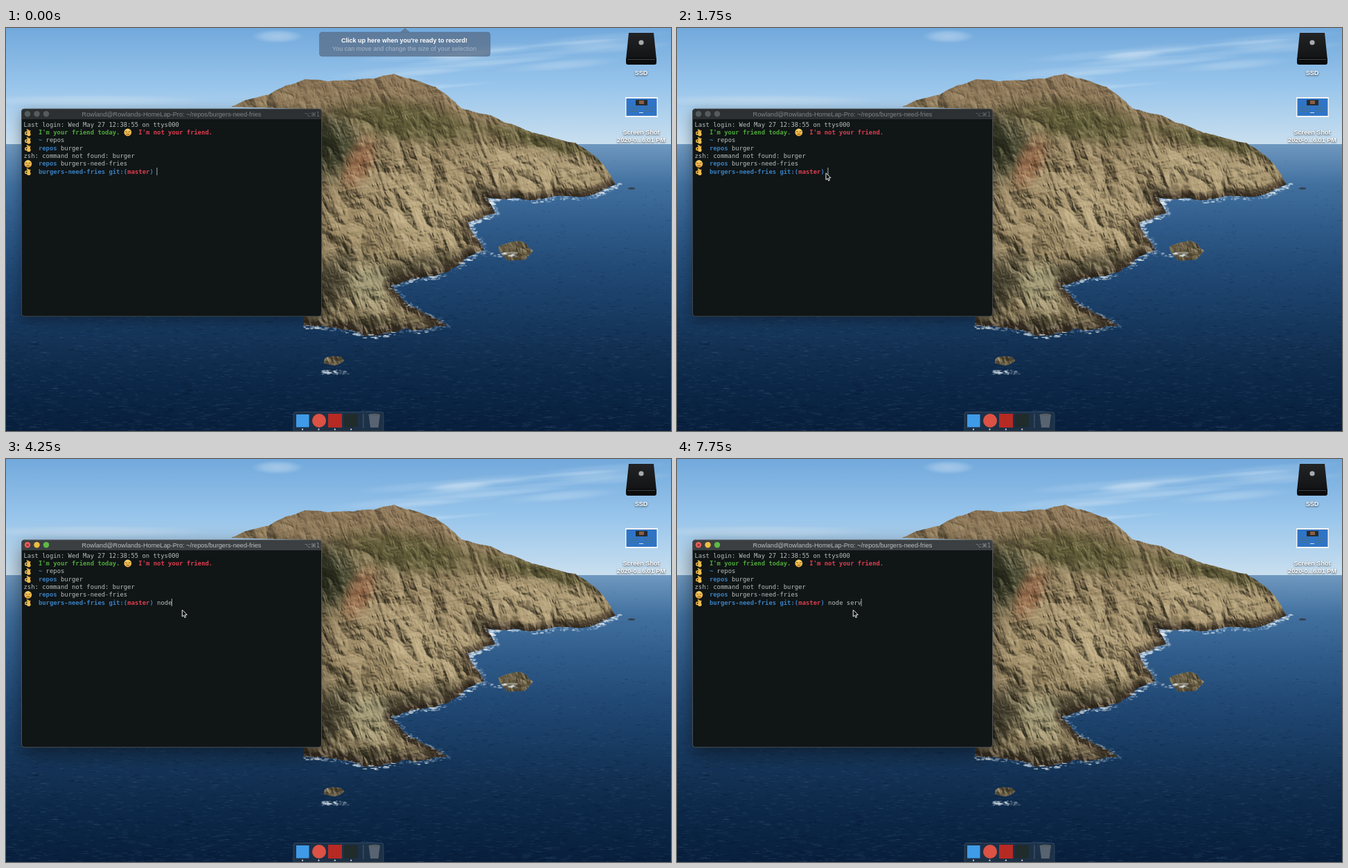
Animation of 960x583 px, one loop 8 s. Source, as an HTML page with a canvas:

```html
<!DOCTYPE html>
<html lang="en">
<head>
<meta charset="utf-8">
<title>Desktop recording</title>
<style>
  html, body { margin: 0; width: 100%; height: 100%; overflow: hidden; background: #12304f; }
  canvas { display: block; width: 100%; height: 100%; }
</style>
</head>
<body>
<canvas id="stage" width="960" height="583"></canvas>
<script>
const W = 960, H = 583, LOOP = 8000, STEP = 250;
const UI = '"Liberation Sans", sans-serif';
const MONO = '"DejaVu Sans Mono", monospace';
const SIZE = 8.887, CHAR = 5.35, LEFT = 25.5, FIRST = 142.7, LINE = 11.33;
const BLUE = '#3a80c0', RED = '#dd3e50', GREEN = '#4fa83a', GREY = '#b9bec0';
const stage = document.getElementById('stage').getContext('2d');

let seed = 7;
function rand(a = 0, b = 1) {
  seed = (seed * 1664525 + 1013904223) % 4294967296;
  return a + (b - a) * seed / 4294967296;
}

const lerp = (a, b, u) => a + (b - a) * u;

function layer() {
  const canvas = document.createElement('canvas');
  canvas.width = W;
  canvas.height = H;
  return canvas.getContext('2d');
}

function trace(c, pts) {
  c.beginPath();
  pts.forEach(([x, y]) => c.lineTo(x, y));
}

function disc(c, fill, x, y, rx, ry = rx) {
  c.beginPath();
  c.ellipse(x, y, rx, ry, 0, 0, Math.PI * 2);
  c.fillStyle = fill;
  c.fill();
}

function box(c, fill, x, y, w, h, r = 0) {
  c.beginPath();
  c.roundRect(x, y, w, h, r);
  c.fillStyle = fill;
  c.fill();
}

function outline(c, color, width = 0.8) {
  c.strokeStyle = color;
  c.lineWidth = width;
  c.stroke();
}

function label(c, text, x, y, font, fill, align = 'left') {
  c.font = font;
  c.textAlign = align;
  c.fillStyle = fill;
  c.fillText(text, x, y);
}

function vertical(c, y0, y1, ...colors) {
  const g = c.createLinearGradient(0, y0, 0, y1);
  colors.forEach((col, i) => g.addColorStop(i / (colors.length - 1), col));
  return g;
}

// Soft elliptic patch; color is a "r,g,b" string
function glow(c, color, alpha, x, y, rx, ry, tilt = 0) {
  c.save();
  c.translate(x, y);
  c.rotate(tilt);
  c.scale(rx, ry);
  const g = c.createRadialGradient(0, 0, 0, 0, 0, 1);
  g.addColorStop(0, `rgba(${color},${alpha})`);
  g.addColorStop(0.5, `rgba(${color},${alpha * 0.75})`);
  g.addColorStop(1, `rgba(${color},0)`);
  disc(c, g, 0, 0, 1);
  c.restore();
}

function drawSky(c) {
  box(c, vertical(c, 0, 168, '#72a9dc', '#98c5eb', '#c9dfef'), 0, 0, W, 169);
  for (let i = 0; i < 22; i++) {
    const x = rand(520, 900), y = 75 - (x - 520) * 0.13 + rand(-28, 28);
    glow(c, '228,239,247', rand(0.1, 0.3), x, y, rand(40, 110), rand(3, 9), -0.08);
  }
  glow(c, '228,239,247', 0.4, 392, 12, 38, 10);
  glow(c, '215,230,242', 0.4, 120, 105, 180, 9);
}

function drawSea(c) {
  box(c, vertical(c, 168, H, '#6f98bf', '#41709f', '#2f5b8a', '#224a76', '#193d65', '#123052', '#0b2646', '#08203d'),
    0, 168, W, H - 168);
  for (let i = 0; i < 5000; i++) {
    const near = Math.sqrt(rand());
    c.fillStyle = rand() < 0.55 ? 'rgba(3,16,38,.2)' : 'rgba(120,155,190,.1)';
    c.fillRect(rand(-10, W), 170 + near * 413, 2 + near * rand(2, 10), 0.5 + near * 0.7);
  }
}

// Midpoint displacement gives a broken, rocky line
function rough(pts, amount = 0.09, depth = 4) {
  if (!depth) return pts;
  const out = [pts[0]];
  for (let i = 1; i < pts.length; i++) {
    const [ax, ay] = pts[i - 1], [bx, by] = pts[i], k = rand(-amount, amount);
    out.push([(ax + bx) / 2 + (by - ay) * k, (ay + by) / 2 - (bx - ax) * k], pts[i]);
  }
  return rough(out, amount, depth - 1);
}

function rock(x, y, w, h) {
  const pts = [];
  for (let a = 0; a < Math.PI * 2; a += 0.5) {
    const r = rand(0.85, 1.1);
    pts.push([x + Math.cos(a) * w * r, y + Math.sin(a) * h * r]);
  }
  return pts;
}

function hash(x, y) {
  const v = Math.sin(x * 127.1 + y * 311.7) * 43758.5453;
  return v - Math.floor(v);
}

function noise(x, y) {
  const i = Math.floor(x), j = Math.floor(y), u = x - i, v = y - j;
  return lerp(lerp(hash(i, j), hash(i + 1, j), u), lerp(hash(i, j + 1), hash(i + 1, j + 1), u), v);
}

function height(x, y) {
  let sum = 0;
  for (let size = 34; size > 2; size /= 2.1) {
    sum += size * Math.abs(noise((x - y * 0.35) / size, (y + x * 0.2) / (size * 1.3)) - 0.5);
  }
  return sum;
}

// Rock relief: slopes facing the upper right are lit
function makeRelief() {
  const c = layer(), x0 = 310, y0 = 60, w = 580, h = 445;
  const img = c.createImageData(w, h);
  let above = new Float32Array(w);
  for (let y = 0; y < h; y++) {
    const row = new Float32Array(w);
    for (let x = 0; x < w; x++) {
      row[x] = height(x, y);
      const slope = row[x] - above[Math.min(x + 1, w - 1)];
      const strength = Math.min(1, 0.45 + y / 260);
      const tone = slope > 0 ? [226, 208, 168, 62] : [28, 25, 16, 95];
      tone[3] *= Math.min(2.1, Math.abs(slope)) * strength;
      img.data.set(tone, (y * w + x) * 4);
    }
    above = row;
  }
  c.putImageData(img, x0, y0);
  return c.canvas;
}

function foam(c, line, count) {
  for (let i = 0; i < count; i++) {
    const [x, y] = line[Math.floor(rand(0, line.length))];
    const patch = noise(x / 22, y / 22);
    disc(c, `rgba(224,234,240,${rand(0.2, 1) * patch})`,
      x + rand(-3, 7), y + rand(-1, 5), rand(0.7, 1 + patch * 5), rand(0.4, 1.3));
  }
}

function drawIsland(c) {
  const ridge = rough([[325, 114], [432, 74], [500, 76], [560, 66], [620, 85], [657, 116],
    [740, 143], [822, 166], [864, 200], [880, 226]], 0.05);
  const shore = rough([[880, 226], [840, 243], [695, 246], [707, 268], [667, 282], [690, 321],
    [640, 352], [555, 372], [582, 402], [637, 430], [520, 446], [430, 430]], 0.07);
  const islet = rock(735, 322, 24, 15), reef = rock(472, 481, 15, 7);

  const land = layer();
  land.fillStyle = vertical(land, 66, 446, '#8d7658', '#8f7d5b', '#a08d68', '#94835f', '#776a4d');
  [[...ridge, ...shore, [430, 117]], islet, reef].forEach(pts => { trace(land, pts); land.fill(); });

  land.globalCompositeOperation = 'source-atop';
  const green = '72,74,38', dark = '38,38,28', pale = '186,168,128';
  glow(land, green, 0.8, 580, 135, 125, 36, 0.15);
  glow(land, green, 0.7, 765, 162, 120, 16, 0.24);
  glow(land, '45,52,34', 1, 466, 170, 50, 62, 0.3);
  glow(land, '148,92,62', 0.7, 510, 195, 24, 50, 0.45);
  glow(land, pale, 0.75, 760, 203, 130, 34, 0.15);
  glow(land, pale, 0.75, 600, 265, 80, 58, 0.5);
  glow(land, dark, 0.5, 692, 240, 40, 18);
  glow(land, dark, 0.8, 470, 370, 34, 70, 0.5);
  glow(land, dark, 0.65, 585, 350, 110, 24, -0.25);
  glow(land, '178,172,134', 0.8, 525, 374, 42, 50);
  glow(land, dark, 0.7, 520, 437, 130, 24);
  [islet, reef].forEach(pts => { trace(land, pts); land.fillStyle = 'rgba(52,47,33,.6)'; land.fill(); });
  land.lineJoin = 'round';
  for (let w = 4; w <= 24; w += 5) {
    trace(land, shore);
    outline(land, 'rgba(42,34,25,.28)', w);
  }
  land.drawImage(makeRelief(), 0, 0);

  foam(c, shore, 650);
  c.drawImage(land.canvas, 0, 0);
  foam(c, shore, 260);
  foam(c, islet.map(([x]) => [x - 22, 326]), 40);
  foam(c, reef.map(([x]) => [x, 496]), 90);
  disc(c, '#34404a', 903, 232, 5, 1.5);
}

function desktopLabel(c, text, y) {
  c.save();
  c.shadowColor = 'rgba(0,0,0,.75)';
  c.shadowBlur = 2.5;
  c.shadowOffsetY = 1;
  label(c, text, 917, y, `bold 9.1px ${UI}`, '#fff', 'center');
  c.restore();
}

function drawIcons(c) {
  trace(c, [[899, 7], [935, 7], [939, 46], [895, 46]]);
  c.fillStyle = vertical(c, 7, 46, '#232426', '#111214');
  c.fill();
  box(c, '#0b0c0d', 895, 43, 44, 10, 3);
  box(c, '#54585b', 897, 45, 40, 0.8);
  disc(c, '#a7aaac', 917, 21, 3.6);
  desktopLabel(c, 'SSD', 68);

  box(c, '#f2f4f5', 894, 100, 47, 29);
  box(c, '#2f74c6', 895.5, 102, 44, 25);
  box(c, '#252b30', 909, 104, 17, 8);
  box(c, '#8a5d43', 914, 105, 7, 5);
  for (let i = 0; i < 6; i++) box(c, '#42718f', 899 + (i % 2) * 22, 114 + (i >> 1) * 3, 14, 1);
  box(c, '#d0dfeb', 914, 122, 6, 1);
  desktopLabel(c, 'Screen Shot', 153.5);
  desktopLabel(c, '2020-0...6.01 PM', 164.5);
}

function drawDock(c) {
  box(c, 'rgba(36,54,74,.72)', 415, 555.5, 130, 32, 3);
  outline(c, 'rgba(105,130,155,.4)');
  box(c, '#3f9be8', 419, 559, 18.5, 18.5);
  disc(c, '#dc5245', 452, 568, 10);
  box(c, '#b62a24', 465, 558, 20, 20);
  box(c, '#202b2b', 488, 558.5, 20, 19, 2);
  box(c, 'rgba(145,165,180,.5)', 515.5, 558, 0.8, 21);
  trace(c, [[523.5, 559], [540, 559], [537.5, 578], [526, 578]]);
  c.fillStyle = 'rgba(120,128,135,.65)';
  c.fill();
  disc(c, '#555d65', 531.7, 559.3, 8, 1.6);
  for (let i = 0; i < 4; i++) disc(c, '#d7dde2', 428 + i * 23.4, 580.7, 1.1);
}

function makeDesktop() {
  const c = layer();
  [drawSky, drawSea, drawIsland, drawIcons, drawDock].forEach(draw => draw(c));
  return c.canvas;
}

function hand(x, y) {
  stage.lineCap = 'round';
  stage.beginPath();
  for (let i = 0; i < 3; i++) {
    stage.moveTo(x + 1.5, y + 2);
    stage.lineTo(x - 1.5 + i * 2.1, y - 4.2 + i * 0.9);
  }
  stage.moveTo(x - 0.6, y + 1);
  stage.arc(x - 2.4, y + 1, 1.8, 0, Math.PI * 2);
  outline(stage, '#f0bd4c', 1.5);
  disc(stage, '#f0bd4c', x + 0.9, y + 2.6, 2.7, 2.7);
}

function face(x, y) {
  disc(stage, vertical(stage, y - 5, y + 5, '#f8d465', '#e8a33c'), x, y, 5.4);
  stage.beginPath();
  for (const s of [-1, 1]) {
    stage.moveTo(x + s * 3.4, y - 1.4);
    stage.lineTo(x + s * 1.3, y - 0.6);
  }
  stage.moveTo(x - 1.9, y + 3);
  stage.quadraticCurveTo(x, y + 1.2, x + 1.9, y + 3);
  outline(stage, '#6e4419');
}

function term(row, col, text, fill = GREY, bold = false) {
  label(stage, text, LEFT + col * CHAR, FIRST + row * LINE, `${bold ? 'bold ' : ''}${SIZE}px ${MONO}`, fill);
}

function drawWindow(active, typed, caretOn) {
  stage.save();
  stage.shadowColor = `rgba(0,0,0,${active ? 0.5 : 0.38})`;
  stage.shadowBlur = active ? 30 : 20;
  stage.shadowOffsetY = active ? 10 : 6;
  box(stage, '#101516', 22.5, 117, 433, 300, 4);
  stage.restore();
  box(stage, active ? '#3b3f41' : '#2c3032', 22.5, 117, 433, 15, [4, 4, 0, 0]);
  stage.beginPath();
  stage.roundRect(22.5, 117, 433, 300, 4);
  outline(stage, active ? '#5a5f61' : '#4b5052');

  ['#ec5f57', '#f0bd3f', '#5dbb45'].forEach((col, i) =>
    disc(stage, active ? col : '#565b5d', 31 + i * 13.5, 124.3, 4.2));
  if (active) label(stage, '×', 31, 127.2, `bold 8px ${UI}`, '#7c241f', 'center');
  label(stage, 'Rowland@Rowlands-HomeLap-Pro: ~/repos/burgers-need-fries', 239, 127.7,
    `9.18px ${UI}`, active ? '#bbbfc1' : '#7e8486', 'center');
  label(stage, '⌥⌘1', 453, 127.5, '8px "DejaVu Sans", sans-serif', active ? '#8b9092' : '#656b6d', 'right');

  term(0, 0, 'Last login: Wed May 27 12:38:55 on ttys000');
  [1, 2, 3, 6].forEach(row => hand(32, 139.8 + row * LINE));
  face(175.8, 151);
  face(31.8, 196.5);
  term(1, 4, "I'm your friend today.", GREEN, true);
  term(1, 31, "I'm not your friend.", RED, true);
  term(2, 4, '~', BLUE, true);
  term(2, 6, 'repos');
  term(3, 4, 'repos', BLUE, true);
  term(3, 10, 'burger');
  term(4, 0, 'zsh: command not found: burger');
  term(5, 4, 'repos', BLUE, true);
  term(5, 10, 'burgers-need-fries');
  term(6, 4, 'burgers-need-fries git:(', BLUE, true);
  term(6, 28, 'master', RED, true);
  term(6, 34, ')', BLUE, true);
  term(6, 36, typed);
  if (caretOn) box(stage, '#b4b9bb', 217.5 + typed.length * CHAR, 202, 0.9, 11);
}

function drawHint() {
  const fill = 'rgba(88,110,137,.76)';
  box(stage, fill, 452.5, 6, 246.5, 35, 4);
  outline(stage, 'rgba(70,95,125,.5)');
  trace(stage, [[569, 6], [576, 0], [583, 6]]);
  stage.fill();
  label(stage, "Click up here when you're ready to record!", 575, 21.3, `bold 9px ${UI}`, '#fff', 'center');
  label(stage, 'You can move and change the size of your selection', 575, 32.7, `9px ${UI}`, '#a5b6c8', 'center');
}

function drawPointer(x, y) {
  stage.save();
  stage.translate(x, y);
  trace(stage, [[0.5, 0], [0.5, 9.5], [2.7, 7.6], [4.2, 11], [5.9, 10.2], [4.4, 7], [7.2, 6.8]]);
  stage.closePath();
  stage.fillStyle = '#0a0a0a';
  stage.fill();
  outline(stage, '#eef0f0', 1);
  stage.restore();
}

// Keys are [step, ...values], joined by straight lines
const POINTER = [[1, 535, 62], [4, 224, 210], [5, 224, 210], [7, 214.5, 210], [9, 214.5, 210], [11, 253.8, 218.5]];
const TYPING = [[13, 0], [18, 5], [20, 8], [23, 8], [27, 4], [31, 9]];

function track(keys, s) {
  const next = keys.findIndex(k => k[0] > s);
  if (next < 0) return keys[keys.length - 1].slice(1);
  const b = keys[next], a = keys[Math.max(0, next - 1)];
  const u = next ? (s - a[0]) / (b[0] - a[0]) : 0;
  return a.slice(1).map((v, i) => lerp(v, b[i + 1], u));
}

const desktop = makeDesktop();

function frame(now) {
  const s = Math.floor((now % LOOP) / STEP);
  const [count] = track(TYPING, s);
  stage.drawImage(desktop, 0, 0);
  drawWindow(s >= 8, 'node serv'.slice(0, Math.floor(count + 0.001)), s !== 8 && s !== 11);
  if (s === 0) drawHint();
  else drawPointer(...track(POINTER, s));
  requestAnimationFrame(frame);
}
requestAnimationFrame(frame);
</script>
</body>
</html>
```
